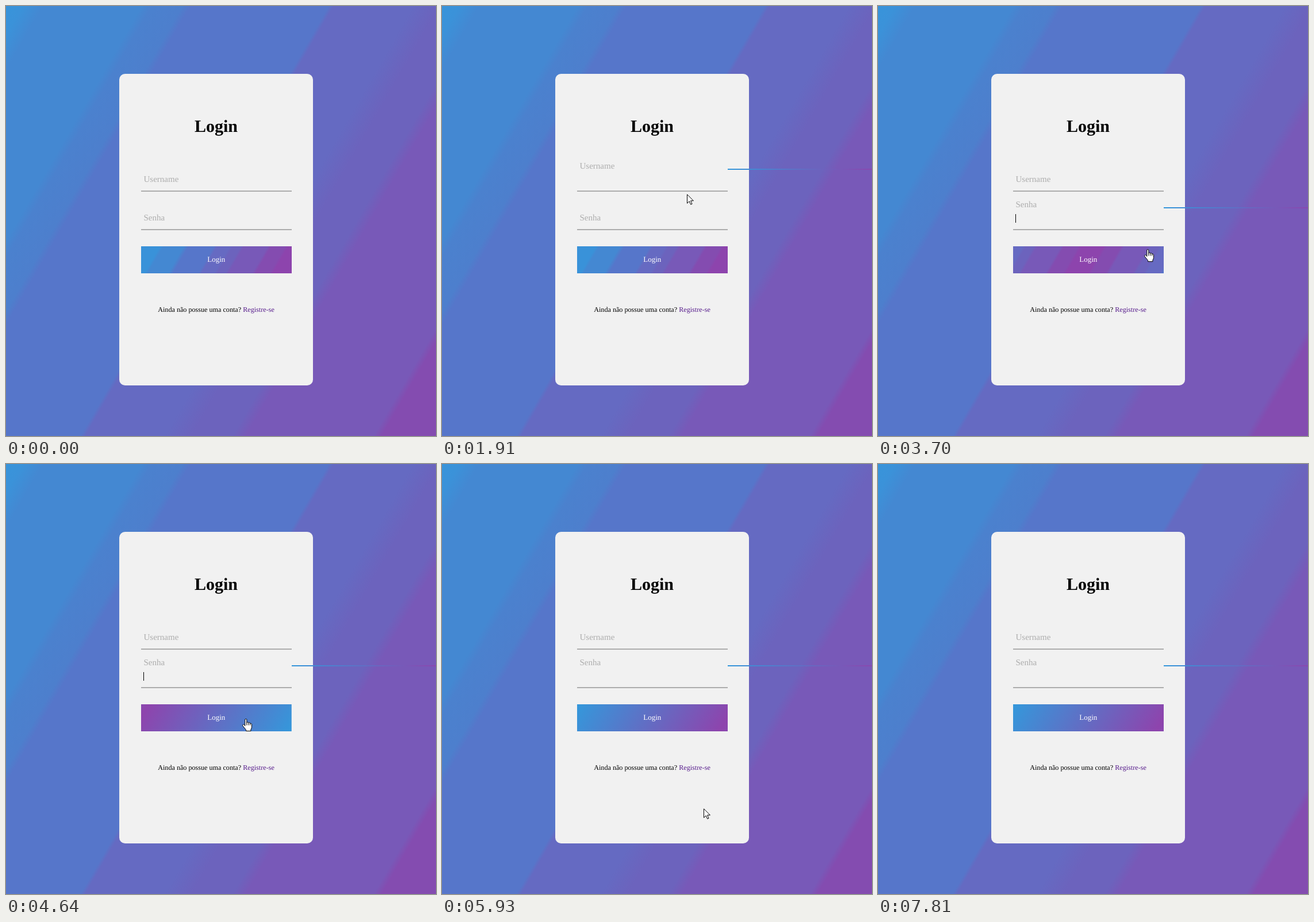
Write an HTML page that moves like this. It is 748 px wide and 748 px high and loops after 8000 ms.

```html
<!DOCTYPE html>
<html lang="pt-BR">
<head>
<meta charset="utf-8">
<title>Login</title>
<style>
html, body { margin: 0; width: 100%; height: 100%; overflow: hidden; }
body { font-family: "Liberation Serif", "Times New Roman", serif; text-rendering: geometricPrecision; }
.stage {
  position: relative; width: 748px; height: 748px; overflow: hidden;
  background: linear-gradient(120deg,
    #3894da 0%, #3b92d9 2.5%, #4488d2 5.5% 20%, #4b81ce 21.5%, #4d7fcd 26%,
    #5676ca 27.2% 47.6%, #656ac2 48.3% 60%, #6c63bd 64% 70%,
    #7859b8 72% 90.8%, #844cb0 92% 100%);
}
.stage div { position: absolute; white-space: nowrap; }
.card { left: 197px; top: 118px; width: 337px; height: 542px; border-radius: 10px; background: #f1f1f1; }
.title { left: 197px; top: 193px; width: 337px; font: bold 30px/34px "Liberation Serif", serif; text-align: center; }

/* Fields */
.field { left: 235px; width: 261.5px; height: 40px; border-bottom: 2px solid #adadad; }
.user { top: 281px; }
.pass { top: 348px; }
.label { left: 4.5px; top: 12px; font-size: 15px; line-height: 18px; color: #adadad; }
.streak { left: 261.5px; top: 2px; height: 2px; width: 0; background: linear-gradient(120deg, #3498db, #8e44ad); }
.caret { left: 4px; top: 14px; width: 1px; height: 15px; background: #000; opacity: 0; }

.label, .streak, .cursor { animation: 8s ease infinite; }
.caret, .shape { animation: 8s step-end infinite; }
.user .label { animation-name: user-label; }
.pass .label { animation-name: pass-label; }
.user .streak { animation-name: user-streak; }
.pass .streak { animation-name: pass-streak; }
.user .caret { animation-name: user-caret; }
.pass .caret { animation-name: pass-caret; }

@keyframes user-label {
  0%, 14.25%, 37.85%, 100% { transform: none; }
  20.5%, 31.6% { transform: translateY(-23px); }
}
@keyframes user-streak {
  0%, 14.25%, 37.85%, 100% { width: 0; }
  20.5%, 31.6% { width: 261.5px; }
}
@keyframes pass-label {
  0%, 31.6% { transform: none; }
  37.85%, 100% { transform: translateY(-23px); }
}
@keyframes pass-streak {
  0%, 31.6% { width: 0; }
  37.85%, 100% { width: 261.5px; }
}
@keyframes user-caret {
  0%, 20.8%, 31.6%, 100% { opacity: 0; }
  14.25%, 27.3% { opacity: 1; }
}
@keyframes pass-caret {
  0%, 38.1%, 46.6%, 59.1%, 71.6%, 84.5%, 97.62%, 100% { opacity: 0; }
  31.6%, 40%, 52.8%, 65.4%, 78%, 91.12% { opacity: 1; }
}

/* Button */
.button { left: 235px; top: 418px; width: 261.5px; height: 46.5px; }
.fill {
  inset: 0; background-size: 200% 100%;
  animation: hover 8s ease infinite;
}
.banded {
  background-image: linear-gradient(120deg,
    #3992d9 0% 6%, #4488d2 7% 13.5%, #5676ca 15% 23%, #666ac2 24% 28%, #6c63bd 29% 31.5%,
    #7859b8 32.5% 40%, #844cb0 41% 45.5%, #8d44ad 46.5% 53.5%, #844cb0 54.5% 59%,
    #7859b8 60% 67.5%, #6c63bd 68.5% 71%, #666ac2 72% 76%, #5676ca 77% 85%,
    #4488d2 86.5% 93%, #3992d9 94% 100%);
}
.smooth {
  background-image: linear-gradient(120deg, #3498db, #8e44ad, #3498db);
  animation: hover 8s ease infinite, refine 8s step-end infinite;
}
.caption { inset: 0; font-size: 13px; line-height: 46px; text-align: center; color: #fff; }
@keyframes hover {
  0%, 45.12%, 65.5%, 100% { background-position: 0 0; }
  48.87%, 59.5% { background-position: 100% 0; }
}
@keyframes refine {
  0% { opacity: 0; }
  48.87%, 100% { opacity: 1; }
}
.signup { left: 197px; top: 520px; width: 337px; font-size: 12.15px; line-height: 16px; text-align: center; }
.signup span { color: #551a8b; }

/* Pointer */
.cursor { left: 0; top: 0; animation-name: travel; }
.cursor svg { position: absolute; left: -12px; top: -12px; }
.shape { opacity: 0; }
.arrow { animation-name: arrow; }
.beam { animation-name: beam; }
.hand { animation-name: hand; }
@keyframes travel {
  0%, 1.12% { transform: translate(742px, 562px); animation-timing-function: ease-out; }
  10.75%, 18% { transform: translate(332px, 306px); }
  23.5%, 24.5% { transform: translate(426px, 327px); animation-timing-function: ease-in-out; }
  31%, 34.5% { transform: translate(405px, 370px); animation-timing-function: ease-in-out; }
  44.9% { transform: translate(471px, 419px); animation-timing-function: linear; }
  46.25% { transform: translate(469px, 423px); animation-timing-function: linear; }
  52% { transform: translate(450px, 436px); animation-timing-function: linear; }
  55.2% { transform: translate(420px, 445px); }
  57.5%, 59% { transform: translate(417px, 443px); animation-timing-function: linear; }
  59.6% { transform: translate(424px, 466px); }
  65.5% { transform: translate(460px, 488px); animation-timing-function: ease-in-out; }
  74%, 75.9% { transform: translate(455px, 599px); animation-timing-function: ease-in; }
  84%, 100% { transform: translate(671px, 750px); }
}
@keyframes arrow {
  0%, 5.9%, 9%, 27.8%, 44.6%, 84.1%, 100% { opacity: 0; }
  1.12%, 7.7%, 23%, 39.5%, 59.5% { opacity: 1; }
}
@keyframes beam {
  0%, 7.7%, 23%, 39.5%, 100% { opacity: 0; }
  5.9%, 9%, 27.8% { opacity: 1; }
}
@keyframes hand {
  0%, 59.5%, 100% { opacity: 0; }
  44.6% { opacity: 1; }
}
</style>
</head>
<body>
<div class="stage">
  <div class="card"></div>
  <div class="title">Login</div>

  <div class="field user">
    <div class="label">Username</div>
    <div class="streak"></div>
    <div class="caret"></div>
  </div>
  <div class="field pass">
    <div class="label">Senha</div>
    <div class="streak"></div>
    <div class="caret"></div>
  </div>

  <div class="button">
    <div class="fill banded"></div>
    <div class="fill smooth"></div>
    <div class="caption">Login</div>
  </div>
  <div class="signup">Ainda não possue uma conta? <span>Registre-se</span></div>

  <div class="cursor">
    <svg width="40" height="40" viewBox="-12 -12 40 40" fill="#fff" stroke="#000">
      <path class="shape arrow" d="M.5 .8V16.2L4.2 12.7L6.7 18.3L9 17.3L6.6 11.8H11.4Z"/>
      <path class="shape beam" fill="none" d="M-3 -7.5H-.5M1.5 -7.5H4M.5 -7V7M-3 7.5H-.5M1.5 7.5H4"/>
      <path class="shape hand" d="M-1.2 12.5V2Q-1.2 .5 .3 .5T1.8 2V7.2Q2.2 6 3.4 6.1T4.8 7.6Q5.3 6.7 6.4 6.9T7.7 8.5Q8.2 7.9 9.2 8.3T10.4 10V14.5Q10.4 17 8.9 18.8V21.5H.6V19.5L-4.9 12.8Q-5.9 11.2 -4.6 10.3T-2.2 11.2ZM1.8 7V11.5M4.8 7.5V11.5M7.7 8.5V11.5"/>
    </svg>
  </div>
</div>
</body>
</html>
```
